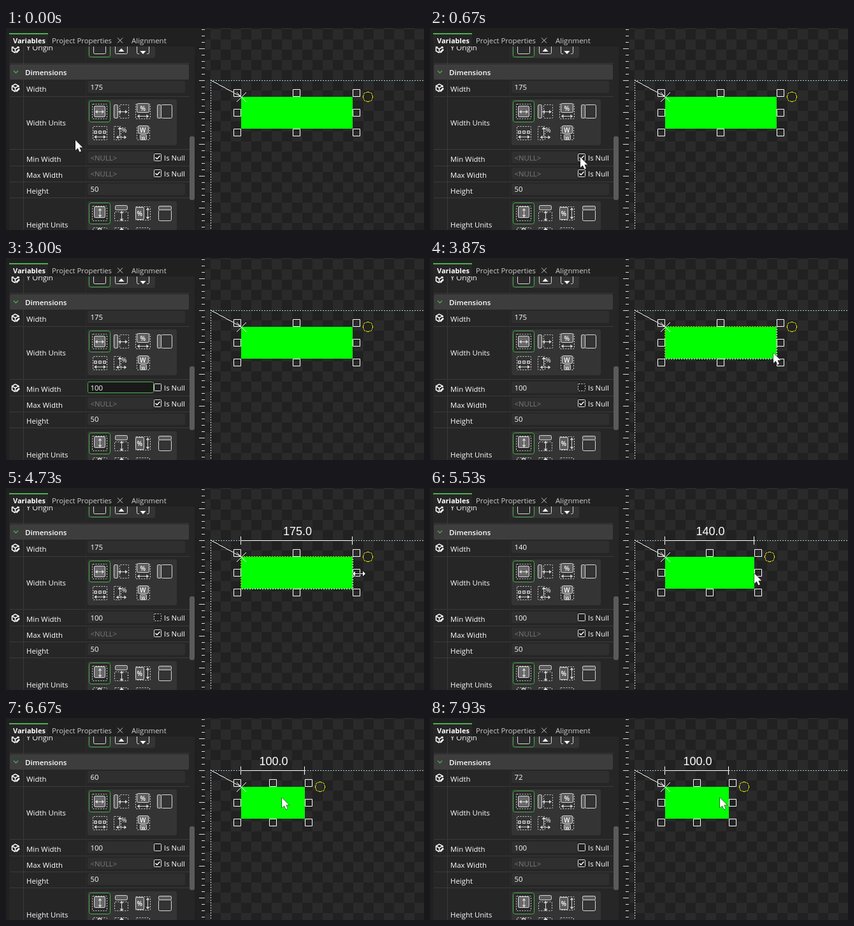
Write an HTML page with a canvas that moves like this. It is 656 px wide and 317 px high and loops after 8000 ms.

```html
<!DOCTYPE html>
<html lang="en">
<head>
<meta charset="utf-8">
<title>Minimum width</title>
<style>
html, body { margin: 0; width: 100%; height: 100%; overflow: hidden; background: #202020; }
canvas { display: block; }
</style>
</head>
<body>
<canvas id="stage" width="656" height="317"></canvas>
<script>
const ctx = document.getElementById('stage').getContext('2d');
const LOOP = 8000, STEP = 1000 / 15;
const UI = '"Open Sans", "Noto Sans", sans-serif';
const GREEN = '#4caf50', PALE = '#d8d8d8', WHITE = '#fff';
const PANEL = '#262626', FIELD = '#2f2f2f', GROUP = '#343434', LINE = '#3a3a3a';

// time, x, y
const MOUSE = [
  [0, 109, 176], [70, 112, 177], [730, 239, 204], [930, 239, 204], [1270, 212, 205],
  [3200, 212, 205], [4070, 590, 140], [4730, 554, 134], [4800, 554, 134],
  [5530, 509, 134], [5670, 498, 134], [6530, 438, 126], [6670, 433, 125],
  [7000, 421, 125], [7400, 440, 125], [7470, 440, 125], [7930, 455, 125]
];
// time, width
const WIDTH = [
  [0, 175], [4800, 175], [5530, 140], [5670, 126], [6530, 64], [6670, 60],
  [7000, 48], [7400, 58], [7470, 58], [7930, 72]
];

function at(keys, t, ease) {
  const i = keys.findIndex(k => k[0] > t);
  if (i < 0) return keys[keys.length - 1].slice(1);
  const a = keys[i - 1], b = keys[i];
  let p = (t - a[0]) / (b[0] - a[0]);
  if (ease) p = p * p * (3 - 2 * p);
  return a.slice(1).map((v, n) => v + (b[n + 1] - v) * p);
}

function fill(x, y, w, h, color) {
  ctx.fillStyle = color;
  ctx.fillRect(x, y, w, h);
}

// Line of whole pixels, without smoothing
function crisp(color, x1, y1, x2, y2) {
  const n = Math.max(1, Math.round(Math.max(Math.abs(x2 - x1), Math.abs(y2 - y1))));
  for (let i = 0; i <= n; i++)
    fill(Math.floor(x1 + (x2 - x1) * i / n), Math.floor(y1 + (y2 - y1) * i / n), 1, 1, color);
}

function box(x, y, w, h, color, edge, r = 0) {
  ctx.beginPath();
  ctx.roundRect(x, y, w, h, r);
  if (color) { ctx.fillStyle = color; ctx.fill(); }
  if (edge) {
    ctx.beginPath();
    ctx.roundRect(x + .5, y + .5, w - 1, h - 1, r);
    ctx.strokeStyle = edge;
    ctx.stroke();
  }
}

function dashed(draw) {
  ctx.setLineDash([2, 2]);
  draw();
  ctx.setLineDash([]);
}

function path(color, ...p) {
  ctx.beginPath();
  for (let i = 0; i < p.length; i += 2) ctx.lineTo(p[i], p[i + 1]);
  ctx.strokeStyle = color;
  ctx.stroke();
}

function shape(color, ...p) {
  ctx.beginPath();
  for (let i = 0; i < p.length; i += 2) ctx.lineTo(p[i], p[i + 1]);
  ctx.closePath();
  ctx.fillStyle = color;
  ctx.fill();
}

function text(s, x, y, color = WHITE, font = '500 11.4px ' + UI) {
  ctx.font = font;
  ctx.fillStyle = color;
  ctx.fillText(s, x, y);
}

// Double-headed arrow, horizontal unless turned
function arrows(x, y, half, turned) {
  ctx.save();
  ctx.translate(x, y);
  if (turned) ctx.rotate(Math.PI / 2);
  path(PALE, -half, 0, half, 0);
  for (const s of [-1, 1]) shape(PALE, s * half, 0, s * (half - 3.5), -3, s * (half - 3.5), 3);
  ctx.restore();
}

const dots = (x, y, w, h) => dashed(() => box(x, y, w, h, null, PALE, 1));

function cube(y) {
  ctx.lineWidth = 1.5;
  path(WHITE, 20, y - 1, 20, y - 3, 14.5, y - 6, 9.5, y - 3, 9.5, y + 3, 14.5, y + 6);
  path(WHITE, 9.5, y - 3, 14.5, y, 20, y - 3);
  path(WHITE, 14.5, y, 14.5, y + 6);
  ctx.lineWidth = 2.5;
  path(WHITE, 16, y + 5.5, 21, y + .5);
  ctx.lineWidth = 1;
}

function percentBox(x, y, w, h) {
  box(x, y, w, h, '#5c5c5c', PALE, 2);
  text('%', x + w / 2 - 4.5, y + h / 2 + 4, WHITE, '600 10px ' + UI);
}

function widthIcons() {
  box(128, 112, 140, 72, GROUP, null, 3);
  box(130, 114, 34, 34, '#2a2a2a', GREEN, 3);
  dots(135, 119, 24, 24);
  box(138, 122, 18, 18, '#686868', PALE, 2);
  arrows(147, 131.5, 7);

  box(169, 120, 7, 22, '#5c5c5c', PALE, 2);
  dots(178, 120, 15, 22);
  arrows(183.5, 131.5, 7);

  dots(203, 119, 24, 24);
  percentBox(205, 118, 20, 15);
  arrows(215, 138.5, 9);

  box(237, 120, 7, 22, '#5c5c5c', PALE, 2);
  box(243, 120, 18, 22, GROUP, PALE, 2);

  dots(136, 154, 23, 22);
  for (let i = 0; i < 3; i++) box(138 + i * 7, 161, 5, 5, '#686868', PALE);
  arrows(147.5, 171, 9);

  dots(169, 154, 12, 22);
  path(PALE, 178.5, 158, 178.5, 170);
  shape(PALE, 178.5, 155, 175.5, 159, 181.5, 159);
  text('%', 181, 164, PALE, '600 10px ' + UI);
  arrows(181, 171.5, 8);

  dots(205, 154, 21, 22);
  box(207, 153, 17, 13, '#686868', PALE, 2);
  text('W', 210, 163.5, WHITE, '600 10px ' + UI);
  box(210, 167, 11, 9, '#686868', PALE, 1);
  text('W', 212, 174.5, WHITE, '600 7px ' + UI);
}

function heightIcons() {
  box(128, 272, 140, 72, GROUP, null, 3);
  box(130, 274, 34, 34, '#2a2a2a', GREEN, 3);
  dots(135, 279, 24, 24);
  box(138, 280, 18, 18, '#686868', PALE, 2);
  arrows(147.5, 290, 7, true);

  box(171, 278, 20, 8, '#5c5c5c', PALE, 2);
  dots(170, 288, 22, 15);
  arrows(181.5, 295, 8, true);

  dots(203, 280, 24, 22);
  percentBox(203, 281, 14, 20);
  arrows(222.5, 291, 9, true);

  box(239, 279, 21, 7, '#5c5c5c', PALE, 2);
  box(239, 285, 21, 18, GROUP, PALE, 2);

  dots(136, 313, 23, 22);
  box(144, 314, 6, 5, '#686868', PALE);
  dots(170, 313, 22, 22);
  shape(PALE, 181.5, 313, 178, 317, 185, 317);
  dots(204, 313, 22, 22);
}

function originIcons() {
  box(128, 10, 106, 37, GROUP, null, 3);
  box(130, 12, 34, 34, '#2a2a2a', GREEN, 3);
  for (const x of [137, 171, 205]) box(x, 21, 20, 20, null, PALE, 2);
  shape(WHITE, 181, 32, 176.5, 37, 185.5, 37);
  fill(209, 38, 12, 4, GROUP);
  shape(WHITE, 215, 41, 210.5, 36, 219.5, 36);
}

function checkbox(y, on, focused) {
  const draw = () => box(232, y, 12, 12, '#202020', '#e8e8e8', 1);
  focused ? dashed(draw) : draw();
  if (on) {
    ctx.lineWidth = 1.5;
    path(WHITE, 234.5, y + 6, 237, y + 8.5, 241.5, y + 3.5);
    ctx.lineWidth = 1;
  }
  text('Is Null', 248, y + 11);
}

function minWidthField(t) {
  const isNull = t < 930, focus = t >= 1270 && t < 3270;
  const selected = t >= 1470 && t < 2200;
  box(128, 194, 104, 18, focus ? '#191919' : FIELD, focus ? GREEN : null, 2);
  if (selected) fill(133, 195, 7, 15, '#0b4f82');
  const value = isNull ? '<NULL>' : t < 2200 ? '0' : t < 2270 ? '1' : t < 2470 ? '10' : '100';
  text(value, 132.5, 208, isNull ? '#7a7a7a' : selected ? '#9cc9ee' : WHITE);
  if (t >= 2200 && t < 3000) fill(Math.floor(132 + 6.7 * value.length), 196, 1, 14, WHITE);
  checkbox(197, isNull, t >= 3270 && t < 4870);
  if (!isNull) cube(204);
}

function panel(t, width) {
  fill(0, 0, 303, 317, '#202020');
  fill(5, 9, 61, 20, PANEL);
  ctx.save();
  ctx.beginPath();
  ctx.rect(0, 29, 300, 288);
  ctx.clip();
  fill(5, 29, 291, 288, PANEL);
  for (const y of [55, 107, 190, 216, 241, 266]) fill(6, y, 282, 1, LINE);
  fill(27, 29, 1, 288, LINE);
  fill(125, 29, 1, 288, '#2d2d2d');
  cube(33);
  text('Y Origin', 32, 35);
  originIcons();

  box(6, 57, 281, 24, '#3d3d3d', null, 2);
  ctx.lineWidth = 1.3;
  path(GREEN, 12, 67, 15.5, 70.5, 19, 67);
  ctx.lineWidth = 1;
  text('Dimensions', 30, 74, WHITE, '600 11.5px ' + UI);

  cube(94);
  text('Width', 32, 100);
  box(128, 83, 153, 19, FIELD, null, 2);
  text(String(Math.round(width)), 132.5, 97);
  text('Width Units', 32, 153);
  widthIcons();

  text('Min Width', 32, 210);
  minWidthField(t);
  text('Max Width', 32, 235);
  box(128, 219, 104, 18, FIELD, null, 2);
  text('<NULL>', 132.5, 233, '#7a7a7a');
  checkbox(222, true);

  text('Height', 32, 260);
  box(128, 244, 153, 18, FIELD, null, 2);
  text('50', 132.5, 257);
  text('Height Units', 32, 313);
  heightIcons();
  box(288, 170, 8, 100, '#5a5a5a', null, 3);
  ctx.restore();

  fill(5, 8, 61, 2, GREEN);
  text('Variables', 11, 24, WHITE, '700 11px ' + UI);
  text('Project Properties', 72, 24, '#cfcfcf', '11.3px ' + UI);
  text('Alignment', 197, 24, '#cfcfcf', '11.5px ' + UI);
  path('#d0d0d0', 175, 15.5, 183, 23.5);
  path('#d0d0d0', 183, 15.5, 175, 23.5);
}

function canvasArea(t, width, hover) {
  for (let i = -1; i < 21; i++)
    for (let j = -6; j < 15; j++)
      fill(321 + i * 16, 82 + j * 16, 16, 16, (i + j) & 1 ? '#2a2a2a' : '#212121');
  fill(301, 0, 12, 317, '#202020');
  for (let i = -8; i < 24; i++) {
    const length = i % 5 ? 5 : 9;
    fill(312 - length, 82 + i * 10, length, 1, '#e0e0e0');
  }

  dashed(() => {
    path('#a5d5de', 321, 82.5, 656, 82.5);
    path('#d0e0e4', 321.5, 81, 321.5, 317);
  });

  const shown = Math.max(100, Math.round(width)), left = 369, right = left + shown;
  const mid = left + shown / 2;
  fill(left, 108, shown, 50, '#0f0');
  if (hover) {
    box(368, 107, shown + 2, 52, null, '#222');
    dashed(() => {
      path('#e8a030', 368.5, 159, 368.5, 107.5, right + 1, 107.5);
      path(WHITE, right + .5, 107, right + .5, 158.5, 368, 158.5);
    });
  }
  crisp(WHITE, 321, 82, left, 108);
  crisp(WHITE, 362, 101, 376, 115);
  crisp(WHITE, 376, 101, 362, 115);
  for (const x of [363, Math.floor(mid), right + 6])
    for (const y of [102, 133, 164])
      if (y !== 133 || x !== Math.floor(mid)) box(x - 6, y - 6, 12, 12, null, WHITE);

  const rim = i => [right + 24 + 7.5 * Math.cos(i * Math.PI / 8), 108 + 7.5 * Math.sin(i * Math.PI / 8)];
  for (let i = 0; i < 16; i++) crisp('#ff0', ...rim(i), ...rim(i + 1));

  if (t >= 4460) {
    path(WHITE, left, 82.5, right, 82.5);
    for (const x of [left, right]) fill(x - 1, 76, 1, 13, WHITE);
    ctx.textAlign = 'center';
    text(shown.toFixed(1), mid + 1, 74, WHITE, '18px "Liberation Sans", Arial, sans-serif');
    ctx.textAlign = 'left';
  }
}

function cursor(t, x, y) {
  if (t >= 2200 && t < 3270) return;
  ctx.save();
  ctx.translate(Math.round(x), Math.round(y));
  if (t >= 930 && x < 231 && y > 194) {
    for (const d of [-1, 1]) path(WHITE, -3, d * 7.5, 0, d * 7.5, .5, d * 6, 1, d * 7.5, 4, d * 7.5);
    path(WHITE, .5, -7, .5, 7);
  } else {
    const resize = t >= 4460 && t < 4870;
    const p = resize
      ? [-10, .5, -6, -3.5, -6, 0, 6, 0, 6, -3.5, 10, .5, 6, 4.5, 6, 1, -6, 1, -6, 4.5, -10, .5]
      : [0, 0, 0, 16, 3.7, 12.6, 6.4, 18.5, 9, 17.3, 6.4, 11.6, 11.3, 11.6, 0, 0];
    path('#000', ...p);
    shape(WHITE, ...p);
  }
  ctx.restore();
}

function render(now) {
  const step = Math.floor((now % LOOP + 4) / STEP);
  const t = Math.round(step * STEP / 10) * 10;
  const [x, y] = at(MOUSE, t, t < 4800);
  const [width] = at(WIDTH, t);
  const hover = t >= 3270 && t < 4870 && x > 357 && x < 561 && y > 96 && y < 170;
  canvasArea(t, width, hover);
  panel(t, width);
  cursor(t, x, y);
}

let start;
function tick(now) {
  start ??= now;
  render(now - start);
  requestAnimationFrame(tick);
}
requestAnimationFrame(tick);
</script>
</body>
</html>
```
